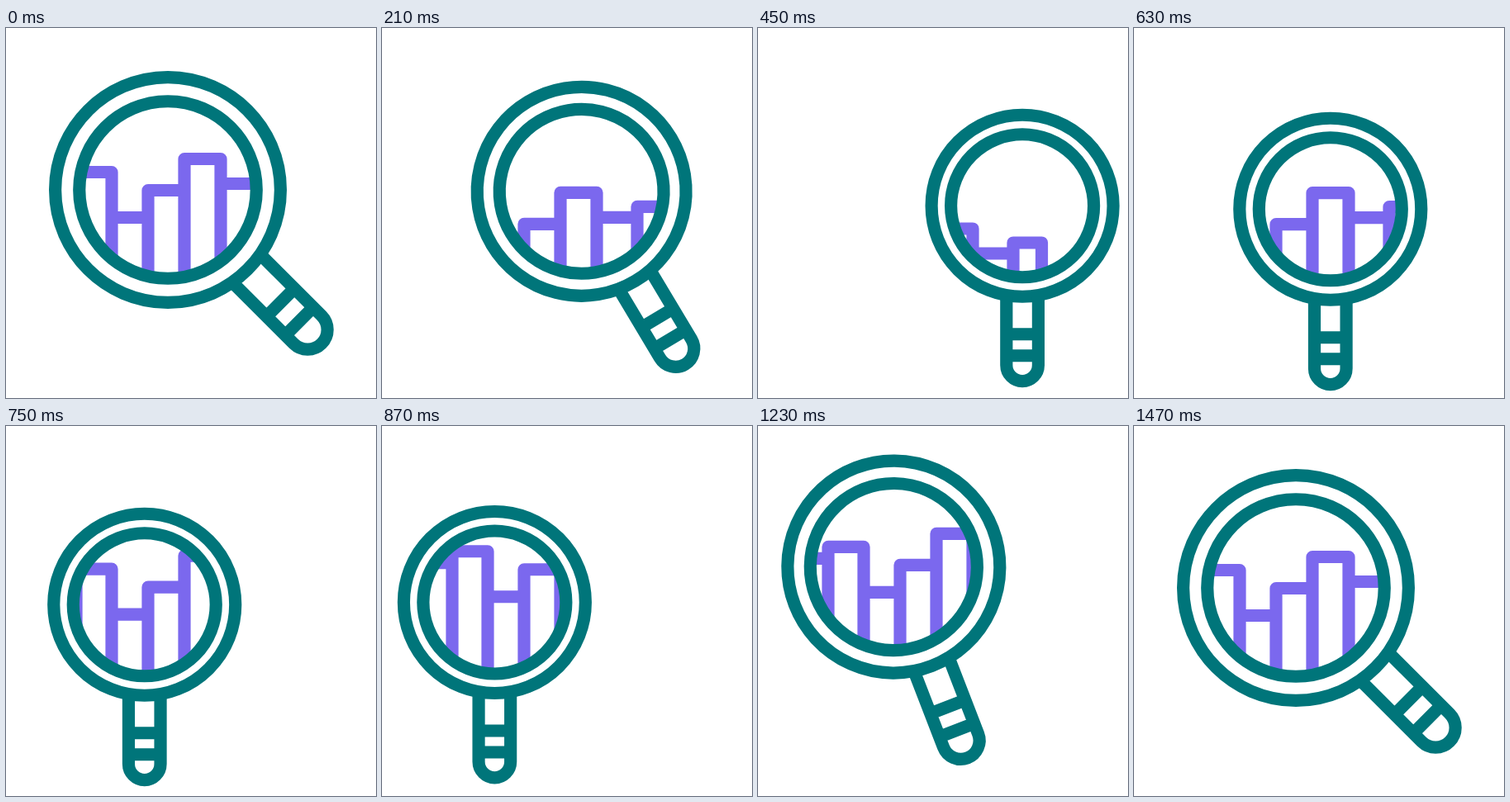
An HTML page that plays this animation: 448 by 448 pixels, repeating every 1.5 s.

```html
<!DOCTYPE html>
<html lang="en">
<head>
<meta charset="utf-8">
<title>Magnifier over chart</title>
<style>
  html, body { margin: 0; width: 100%; height: 100%; overflow: hidden; background: #fff; }
  svg { display: block; width: 100vw; height: 100vh; }
  g { fill: none; stroke-width: 15.2; stroke-linejoin: round; }
  #glass { stroke: #00757a; }
  #chart { stroke: #7b68ee; }
</style>
</head>
<body>
<svg viewBox="0 0 448 448">
  <defs><clipPath id="lens"><circle id="view" r="86.5"/></clipPath></defs>
  <g clip-path="url(#lens)">
    <path id="chart" d="M20 188.5H85 M85 520V174.5H128V520 M128 229.5H172
      M172 520V196.5H216 M216 520V158.5H260V520 M260 188.5H309 M309 520V175.5H343.5V520"/>
  </g>
  <g id="glass">
    <circle r="110"/>
    <circle r="86.5"/>
    <path d="M110 -19.3H193a19.3 19.3 0 0 1 0 38.6H110 M155.5 -19.3v38.6 M181.5 -19.3v38.6"/>
  </g>
</svg>
<script>
const LOOP = 1500, STEP = 30, STROKE = 15.2;
const view = document.getElementById('view');
const glass = document.getElementById('glass');
const chart = document.getElementById('chart');

// Sine ease from 0 to 1 between two times.
function ease(t, from, to) {
  const k = Math.min(1, Math.max(0, (t - from) / (to - from)));
  return (1 - Math.cos(Math.PI * k)) / 2;
}

const hump = k => Math.sin(Math.PI * k);

function draw(t) {
  // The glass goes right, sweeps across to the left, then returns home.
  const out = ease(t, 72, 410);
  const across = ease(t, 410, 875);
  const back = ease(t, 1008, 1470);

  const x = 196 + 127.5 * out - 187.2 * across + 59.7 * back;
  const y = 196 + 19 * ease(t, 180, 330) + 5 * hump(across) - 1.5 * across
    - 44 * ease(t, 975, 1195) + 26.5 * ease(t, 1195, 1470);
  const scale = 1.24 - 0.24 * (ease(t, 72, 400) - ease(t, 870, 1440));
  const angle = 45 + 45 * (ease(t, 72, 437) - back);
  const drop = 85 * ease(t, 72, 355) - 108 * ease(t, 430, 884) + 23 * back - 16 * hump(back);

  const place = `translate(${x} ${y}) rotate(${angle}) scale(${scale})`;
  view.setAttribute('transform', place);
  glass.setAttribute('transform', place);
  glass.style.strokeWidth = STROKE / scale; // line weight stays constant
  chart.setAttribute('transform', `translate(0 ${drop})`);
}

const start = performance.now();
function tick() {
  const t = (performance.now() - start) % LOOP;
  draw(Math.floor(t / STEP) * STEP);
  requestAnimationFrame(tick);
}
tick();
</script>
</body>
</html>
```
